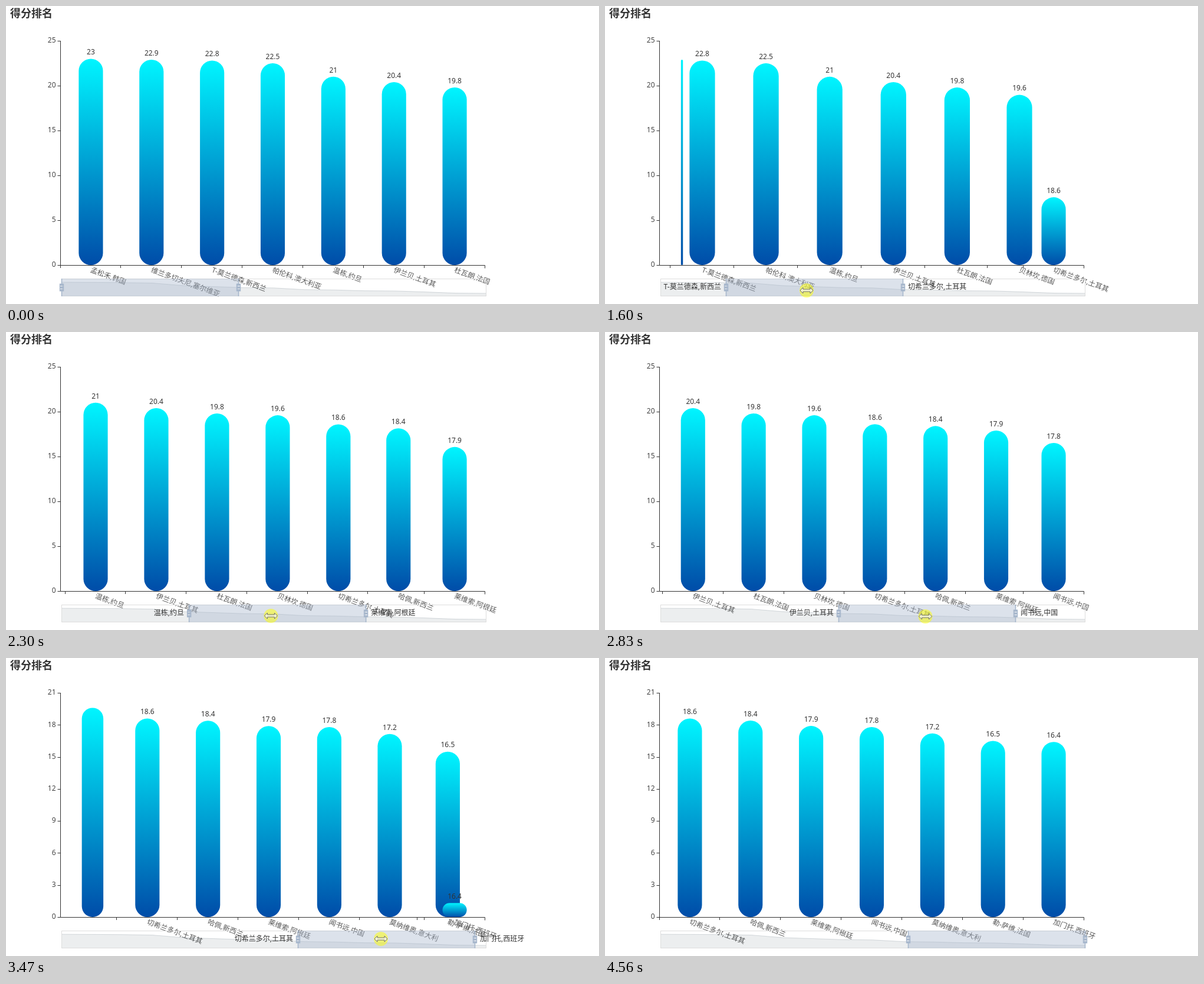
These frames come from a looping animation (1006x505 px, 5560 ms). An HTML page:

```html
<!DOCTYPE html>
<html lang="zh">
<head>
<meta charset="utf-8">
<title>得分排名</title>
<style>
  html, body { margin: 0; width: 100%; height: 100%; overflow: hidden; background: #fff; }
  svg { display: block; font: 12px 'Noto Sans', 'Noto Sans CJK SC', 'Noto Sans CJK', sans-serif; fill: #333; }
  .axis { stroke: #333; fill: none; }
  .num { fill: #444; }
  .name { fill: #555; }
</style>
</head>
<body>
<svg width="1006" height="505" viewBox="0 0 1006 505">
  <defs>
    <linearGradient id="bar" x2="0" y2="1">
      <stop offset="0" stop-color="#00f5ff"/>
      <stop offset="1" stop-color="#004ca8"/>
    </linearGradient>
  </defs>
  <text x="7" y="18.5" font-size="18" font-weight="700">得分排名</text>
  <g id="chart"></g>
  <g id="slider"></g>
</svg>
<script>
const LOOP = 5560, DRAG_START = 1000, END = 4560;
const LEFT = 92.5, WIDTH = 720, BASE = 439, HEIGHT = 380;
const SLIDER = { x: 94.5, y: 462.5, h: 29, span: 300 };

// The chart refreshes at a throttled rate while dragging; each refresh restarts its tweens.
const REFRESH = { first: 1110, every: 101.4 };
const TWEEN = 300, LAG = 16, GROWTH = .7;

const players = [
  ['孟松禾,韩国', 23], ['维兰多切夫尼,塞尔维亚', 22.9], ['T-莫兰德森,新西兰', 22.8],
  ['帕伦科,澳大利亚', 22.5], ['温栋,约旦', 21], ['伊兰贝,土耳其', 20.4],
  ['杜瓦朗,法国', 19.8], ['贝林坎,德国', 19.6], ['切希兰多尔,土耳其', 18.6],
  ['哈佩,新西兰', 18.4], ['莱维索,阿根廷', 17.9], ['闻书远,中国', 17.8],
  ['莫纳维奥,意大利', 17.2], ['勒-萨维,法国', 16.5], ['加门托,西班牙', 16.4]
];

// [ms, steps until the next entry]
const pace = [[DRAG_START, 2], [1140, 6], [1600, 8], [2220, 8], [2830, 8], [3470, 8], [4080, 6], [END, 1]];
// [ms, slider offset]
const drag = [[930, 0], [1140, 36], [1600, 111], [2020, 190], [2300, 216.5], [2430, 230],
  [2740, 282], [2830, 302], [3470, 401], [3590, 420]];
// [ms, x, y]
const pointer = [[930, 232, 483], [1140, 268, 483], [1600, 342, 482], [2300, 450, 481],
  [2830, 543.5, 482], [3470, 636, 476], [4000, 690, 482], [4320, 691, 482], [END, 694, 508]];

const lerp = (a, b, p) => a + (b - a) * p;
const easeOut = x => 1 - (1 - Math.min(1, Math.max(0, x))) ** 3;

function along(points, t, col = 1) {
  const i = points.findIndex(p => p[0] >= t);
  if (i < 0) return points[points.length - 1][col];
  if (i === 0) return points[0][col];
  const a = points[i - 1], b = points[i];
  return lerp(a[col], b[col], (t - a[0]) / (b[0] - a[0]));
}

function stepped(t) {
  if (t < DRAG_START) return drag[0][0];
  if (t >= END) return END;
  const i = pace.findIndex(p => p[0] > t) - 1;
  const [start, steps] = pace[i], len = (pace[i + 1][0] - start) / steps;
  return start + Math.floor((t - start) / len + .05) * len;
}

function layout(first, last) {
  const unit = players[first][1] >= 20 ? 5 : 3;
  const max = Math.ceil(players[first][1] / unit) * unit;
  const slot = WIDTH / (last - first + 1);
  const bars = {}, marks = {};
  for (let i = first; i <= last; i++) {
    bars[i] = { x: LEFT + slot * (i - first + .5), w: slot * .4, h: HEIGHT * players[i][1] / max };
  }
  for (let v = 0; v <= max; v += unit) marks[v] = { y: BASE - HEIGHT * v / max };
  return { bars, marks };
}

function advance(from, to, x) {
  const out = {}, p = easeOut(x);
  for (const id in to) {
    const a = from[id], b = to[id];
    out[id] = { ...b };
    if (a) for (const key in b) out[id][key] = lerp(a[key], b[key], p);
    else if (b.h) out[id].h = b.h * easeOut(x * GROWTH);
  }
  return out;
}

function simulate(t) {
  const gaps = players.length - 1, leaving = [];
  let first = 0, last = 6, { bars, marks } = layout(first, last);
  for (let at = REFRESH.first; at <= t; at += REFRESH.every) {
    const offset = along(drag, at);
    first = Math.round(offset / WIDTH * gaps);
    last = Math.round((offset + SLIDER.span) / WIDTH * gaps);
    const target = layout(first, last);
    for (const i in bars) {
      if (target.bars[i]) continue;
      const b = bars[i], w = b.w * (1 - easeOut((t - at - LAG) / TWEEN));
      if (w > 1.5) leaving.push({ x: b.x - b.w / 2 + w / 2, w, h: b.h });
    }
    const x = (Math.min(t - at, REFRESH.every) - LAG) / TWEEN;
    bars = advance(bars, target.bars, x);
    marks = advance(marks, target.marks, x);
  }
  return { bars, marks, leaving, first, last };
}

const text = (x, y, str, attrs = '') => `<text x="${x}" y="${y}" dy=".36em" ${attrs}>${str}</text>`;
const pill = b => `<rect x="${b.x - b.w / 2}" y="${BASE - b.h}" width="${b.w}" height="${b.h}"
  rx="${Math.min(b.w, b.h) / 2}" fill="url(#bar)"/>`;

function drawChart(s) {
  let ticks = `M${LEFT} ${BASE - HEIGHT}V${BASE + .5}H${LEFT + WIDTH}v5`;
  let names = '', bars = s.leaving.map(pill).join(''), values = '';
  for (const v in s.marks) {
    const y = s.marks[v].y;
    ticks += `M${LEFT} ${Math.round(y) + .5}h-5`;
    names += text(84.5, y - 1, v, 'text-anchor="end" class="num"');
  }
  for (const i in s.bars) {
    const b = s.bars[i], y = BASE + 7.5;
    ticks += `M${Math.round(b.x - b.w * 1.25) - .5} ${BASE}v5`;
    names += text(b.x, y, players[i][0], `class="name" transform="rotate(20 ${b.x} ${y})"`);
    bars += pill(b);
    values += text(b.x, BASE - 11.5 - b.h, players[i][1], 'text-anchor="middle"');
  }
  return `<path class="axis" d="${ticks}"/>${names}${bars}${values}`;
}

const shadow = players.map(([, v], i) => {
  const low = 16.4 - 1.98, range = 6.6 * 1.6;
  return `${SLIDER.x + i * WIDTH / 14} ${SLIDER.y + 30 * (1 - (v - low) / range)}`;
}).join('L');

const handle = x => `<path transform="translate(${x} ${SLIDER.y - .5})" fill="#a7b7cc" fill-rule="evenodd"
  d="M-.8 0h1.6v8.5h2.9v13H.8V30H-.8v-8.5h-2.9v-13h2.9zM-2.1 12v1.2h4.2V12zM-2.1 16.7v1.2h4.2v-1.2z"/>`;

function drawSlider(s, offset, cursor) {
  const { x, y, h, span } = SLIDER, a = x + offset, b = a + span, bottom = y + h;
  let out = `<path d="M${x} ${bottom}L${shadow}V${bottom}z" fill="#2f4554" opacity=".09"/>
    <path d="M${shadow}" fill="none" stroke="#2f4554" stroke-width=".6" opacity=".3"/>
    <rect x="${x}" y="${y}" width="${WIDTH}" height="${h}" fill="none" stroke="#ddd"/>
    <rect x="${a}" y="${y - .5}" width="${span}" height="30" fill="#a7b7cc" opacity=".4"/>
    ${handle(a)}${handle(b)}`;
  if (!cursor) return out;
  if (cursor.y < 492) {
    out += text(a - 8.6, 476, players[s.first][0], 'text-anchor="end"') + text(b + 8.6, 476, players[s.last][0]);
  }
  return out + `<g transform="translate(${cursor.x} ${cursor.y})">
    <circle r="12" fill="#ff0" opacity=".5"/>
    <path d="M-11 0l5-5v3H6v-3l5 5-5 5V2H-6v3z" fill="#f2f2cc" stroke="#666" stroke-width=".9"/></g>`;
}

function cursorAt(t, now) {
  if (t < 370 || t >= END) return null;
  if (t < DRAG_START) {
    const p = Math.min(5, Math.floor((t - 370) / 74)) / 5;
    return { x: lerp(240, 232, p), y: lerp(502, 483, easeOut(p)) };
  }
  return { x: along(pointer, now), y: along(pointer, now, 2) };
}

const chart = document.getElementById('chart'), slider = document.getElementById('slider');

function draw(t) {
  const now = stepped(t), state = simulate(now);
  chart.innerHTML = drawChart(state);
  slider.innerHTML = drawSlider(state, along(drag, now), cursorAt(t, now));
}

const begin = performance.now();
function tick() {
  draw((performance.now() - begin) % LOOP);
  requestAnimationFrame(tick);
}
tick();
</script>
</body>
</html>
```
